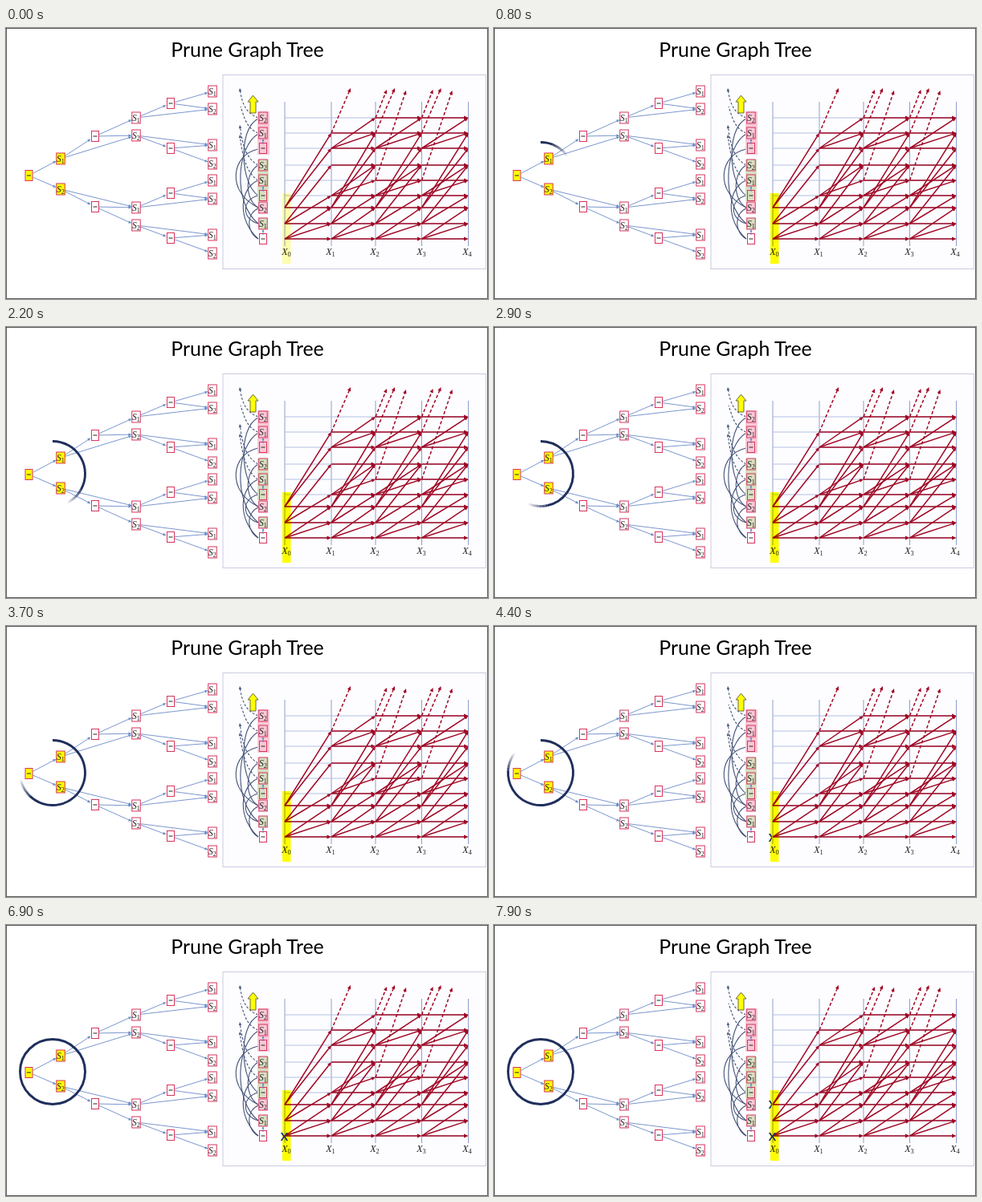
Recreate the animation shown at these times as an HTML page. Size 600 by 338 pixels, loop 8 s.

```html
<!DOCTYPE html>
<html lang="en">
<head>
<meta charset="utf-8">
<title>Prune Graph Tree</title>
<style>
  html, body { margin: 0; width: 100%; height: 100%; overflow: hidden; background: #fff; }
  svg { display: block; width: 100vw; height: 100vh; }
  .title { font: 24.9px Lato, Carlito, sans-serif; text-anchor: middle; }
  .math { font-family: "Liberation Serif", "Noto Serif", serif; font-style: italic; text-anchor: middle; fill: #222; }
  .mark { font: bold 14px Lato, sans-serif; text-anchor: middle; fill: #1f2f62; }
  .highlight { fill: #ff0; mix-blend-mode: multiply; }
</style>
</head>
<body>
<svg id="stage" viewBox="0 0 600 338" xmlns="http://www.w3.org/2000/svg">
  <defs>
    <clipPath id="wipe0"><rect id="wipeRect0" x="341" y="255" width="0" height="18"/></clipPath>
    <clipPath id="wipe1"><rect id="wipeRect1" x="341" y="215" width="0" height="18"/></clipPath>
  </defs>
  <rect width="600" height="338" fill="#fff"/>
  <rect x=".5" y=".5" width="599" height="337" fill="none" stroke="#333" stroke-width=".8"/>
  <text class="title" x="300.5" y="36">Prune Graph Tree</text>
  <g id="tree"></g>
  <rect x="270" y="58.5" width="327.5" height="242" fill="#fdfdff" stroke="#c9cce0"/>
  <g id="trellis"></g>
  <g id="states"></g>
  <rect id="highlight" class="highlight" x="344" y="206" width="10.5" height="88"/>
  <g id="ring"></g>
  <g clip-path="url(#wipe0)"><text class="mark" x="346.5" y="269">X</text></g>
  <g clip-path="url(#wipe1)"><text class="mark" x="346.5" y="229">X</text></g>
</svg>
<script>
const LOOP = 8000;
const NS = "http://www.w3.org/2000/svg";
const get = id => document.getElementById(id);
const clamp = v => Math.max(0, Math.min(1, v));

function add(parent, tag, attrs, text) {
  const el = document.createElementNS(NS, tag);
  for (const key in attrs) el.setAttribute(key, attrs[key]);
  if (text) el.textContent = text;
  parent.appendChild(el);
  return el;
}

function head(parent, x, y, angle, size, color) {
  add(parent, "path", {
    d: `M0 0L${-size} ${-size * .45}V${size * .45}Z`, fill: color,
    transform: `translate(${x} ${y}) rotate(${angle * 180 / Math.PI})`
  });
}

function arrow(parent, x1, y1, x2, y2, color, width, size, dash) {
  const angle = Math.atan2(y2 - y1, x2 - x1);
  const back = size * .7;
  const line = add(parent, "line", {
    x1, y1, x2: x2 - back * Math.cos(angle), y2: y2 - back * Math.sin(angle),
    stroke: color, "stroke-width": width
  });
  if (dash) line.setAttribute("stroke-dasharray", dash);
  head(parent, x2, y2, angle, size, color);
}

function symbol(parent, x, y, letter, index, size) {
  const text = add(parent, "text", { class: "math", x, y, "font-size": size }, letter);
  add(text, "tspan", { dy: 2, "font-size": size * .7, "font-style": "normal" }, index);
}

// kind: 0 is the dash, 1 and 2 are S1 and S2
function node(parent, x, y, kind, fill) {
  const w = kind ? 10.5 : 9, h = kind ? 14 : 13;
  add(parent, "rect", {
    x: x - w / 2, y: y - h / 2, width: w, height: h,
    fill, stroke: "#d8355e", "stroke-width": 1
  });
  if (kind) symbol(parent, x, y + 3.5, "S", String(kind), 11.5);
  else add(parent, "path", { d: `M${x - 2.5} ${y}h5`, stroke: "#222", "stroke-width": 1 });
}

function buildTree() {
  const g = get("tree");
  const xs = [28.5, 68, 111, 162, 205, 257];
  // column, y, kind
  const nodes = [
    [0, 184, 0], [1, 163, 1], [1, 201, 2], [2, 135, 0], [2, 223, 0],
    [3, 112, 1], [3, 134, 2], [3, 224, 1], [3, 246, 2],
    [4, 94, 0], [4, 150, 0], [4, 206, 0], [4, 262, 0],
    [5, 79, 1], [5, 101, 2], [5, 146, 1], [5, 169, 2],
    [5, 190, 1], [5, 213, 2], [5, 258, 1], [5, 281, 2]
  ];
  const children = [
    [1, 2], [3, 6], [4, 7], [5, 6], [7, 8],
    [9, 14], [10, 15], [11, 18], [12, 19],
    [13, 14], [15, 16], [17, 18], [19, 20]
  ];
  children.forEach((list, i) => list.forEach(j => {
    const [a, ya] = nodes[i], [b, yb] = nodes[j];
    const slope = (yb - ya) / (xs[b] - xs[a]);
    arrow(g, xs[a] + 5, ya + slope * 5, xs[b] - 5.5, yb - slope * 5.5, "#6d8bc9", .9, 4);
  }));
  nodes.forEach(([col, y, kind]) => node(g, xs[col], y, kind, col < 2 ? "#ff0" : "#fff"));
}

function buildTrellis() {
  const g = get("trellis");
  const xs = [347, 405, 460, 517.5, 575.5];
  const rows = [112, 131, 150, 171, 190, 209, 224, 244, 263];
  const firstColumn = { 112: 2, 131: 1, 150: 1, 171: 1, 190: 2, 209: 1, 224: 0, 244: 0, 263: 0 };
  const jumps = { 263: [244, 224], 244: [209, 171], 224: [150, 131], 209: [190, 171], 150: [131, 112] };
  const red = "#a00825";

  xs.forEach(x => add(g, "path", { d: `M${x} 92V272`, stroke: "#8e9fce", "stroke-width": 1 }));
  rows.forEach(y => add(g, "path", { d: `M347 ${y}H575`, stroke: "#b3c0e2", "stroke-width": 1 }));

  for (let i = 0; i < 4; i++) {
    for (const y of rows) {
      if (i < firstColumn[y]) continue;
      arrow(g, xs[i], y, xs[i + 1], y, red, 1.7, 5.5);
      for (const end of jumps[y] || []) arrow(g, xs[i], y, xs[i + 1], end, red, 1.5, 5);
    }
    const out = (y, dx, top) => arrow(g, xs[i], y, xs[i] + dx, top, red, 1.5, 5, "4 2.6");
    if (i > 0) out(131, 24, 75);
    if (i > 1) {
      out(112, 14, 77);
      out(190, 38, 78);
    }
  }
  [349, 404, 459, 517, 574].forEach((x, i) => symbol(g, x, 283, "X", String(i), 12));
}

function buildStates() {
  const g = get("states");
  const pink = "#f7c9d6", green = "#d6dfc2", slate = "#465579";
  const curve = (d, dash) => add(g, "path", {
    d, fill: "none", stroke: slate, "stroke-width": 1.1, "stroke-dasharray": dash || "none"
  });
  [
    "M314 224C274 205 280 158 314 151",
    "M314 244C282 218 287 148 314 132",
    "M314 209C292 195 288 126 314 113",
    "M314 224C298 215 296 182 314 171",
    "M314 244C293 238 293 214 314 209",
    "M314 263C288 240 290 200 314 190",
    "M314 263C300 256 298 232 314 225"
  ].forEach(d => curve(d));
  curve("M314 112C300 107 294 96 291.5 78", "3 2");
  curve("M314 131C298 125 296 108 292 98", "3 2");
  curve("M314 171C300 164 294 146 291.5 124", "3 2");
  curve("M314 190C300 182 294 160 291.5 136", "3 2");
  [75, 121, 133].forEach(y => head(g, 291, y, -1.7, 4, slate));

  add(g, "rect", { x: 313, y: 104, width: 15, height: 54, fill: pink });
  add(g, "rect", { x: 313, y: 164, width: 14, height: 52, fill: green });
  [
    [112, 2, pink], [131, 1, pink], [150, 0, pink],
    [171, 2, green], [190, 1, green], [209, 0, green],
    [224, 2, pink], [244, 1, green], [263, 0, "#fff"]
  ].forEach(([y, kind, fill]) => node(g, 320, y, kind, fill));
  [145, 204, 258].forEach(y => arrow(g, 320, y, 320, y - 7, "#5b7fc4", 1, 3));
  add(g, "path", {
    d: "M307.5 84L314 92H311V106H304V92H301Z",
    fill: "#ff0", stroke: "#6b6a45", "stroke-width": 1
  });
}

const RING = { x: 58, y: 183, r: 40.5, feather: 35, speed: .07 };
const FADE_STEPS = 18;
const arcs = Array.from({ length: FADE_STEPS + 1 }, () =>
  add(get("ring"), "path", { fill: "none", stroke: "#1f2f5c", "stroke-width": 2.9 }));

function ringPoint(deg) {
  const a = deg * Math.PI / 180;
  return `${RING.x + RING.r * Math.sin(a)} ${RING.y - RING.r * Math.cos(a)}`;
}

function setArc(el, from, to, opacity) {
  from = Math.max(0, from);
  to = Math.min(360, to);
  if (to <= from) return el.setAttribute("d", "");
  const mid = (from + to) / 2;
  const half = `A${RING.r} ${RING.r} 0 0 1 `;
  el.setAttribute("d", `M${ringPoint(from)}${half}${ringPoint(mid)}${half}${ringPoint(to)}`);
  el.setAttribute("opacity", opacity);
}

// Clockwise wheel wipe with a soft leading edge
function drawRing(t) {
  const solid = t * RING.speed - RING.feather;
  const step = RING.feather / FADE_STEPS;
  setArc(arcs[0], 0, solid, 1);
  for (let i = 0; i < FADE_STEPS; i++) {
    setArc(arcs[i + 1], solid + i * step, solid + (i + 1) * step, 1 - (i + .5) / FADE_STEPS);
  }
}

function draw(t) {
  get("highlight").setAttribute("opacity", .32 + .68 * clamp(t / 500));
  drawRing(t);
  [4200, 7700].forEach((start, i) =>
    get("wipeRect" + i).setAttribute("width", 12 * clamp((t - start) / 500)));
}

buildTree();
buildTrellis();
buildStates();
const began = performance.now();
function tick() {
  draw((performance.now() - began) % LOOP);
  requestAnimationFrame(tick);
}
tick();
</script>
</body>
</html>
```
